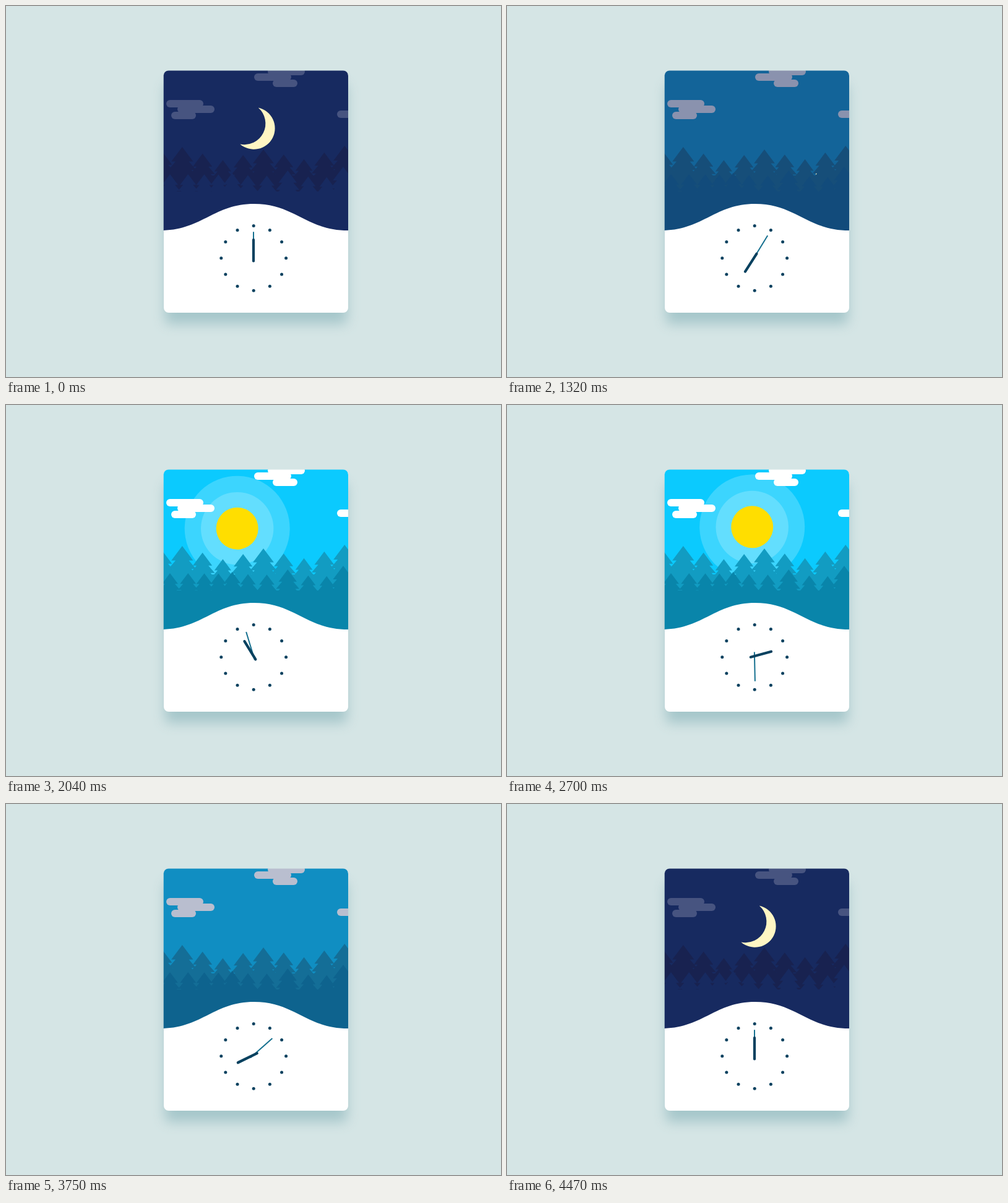
An HTML page that plays this animation: 800x600 px, repeating every 4.5 s.

```html
<!DOCTYPE html>
<html lang="en">
<head>
<meta charset="utf-8">
<title>Day and night clock</title>
<style>
  html, body { margin: 0; width: 100%; height: 100%; overflow: hidden; background: #d5e5e5; }
  .card {
    position: absolute; left: 254.7px; top: 104.5px; width: 298.3px; height: 391px;
    border-radius: 8px; background: #fff; box-shadow: 0 20px 20px -2px #a5c6ca;
  }
  svg { position: absolute; left: 0; top: 0; display: block; }
</style>
</head>
<body>
<div class="card"></div>
<svg width="800" height="600" viewBox="0 0 800 600">
  <clipPath id="card"><rect x="254.7" y="104.5" width="298.3" height="391" rx="8"/></clipPath>
  <clipPath id="hill" clip-path="url(#card)">
    <path d="M249 100V363C317 363 335 320 401 320S485 363 553 363V100Z"/>
  </clipPath>
  <g clip-path="url(#hill)">
    <rect id="sky" x="250" y="100" width="310" height="280"/>
    <g id="wheel">
      <path transform="translate(400.5 197.7)" fill="#fff6c3"
        d="M7.2-33.2A34 34 0 1 1-22.2 25.7A34 34 0 0 0 7.2-33.2Z"/>
      <g transform="rotate(178.4 400.5 351) translate(400.5 197.3)">
        <circle r="85" fill="#fff" opacity=".2"/>
        <circle r="58.7" fill="#fff" opacity=".2"/>
        <circle r="34" fill="#ffde00"/>
      </g>
    </g>
    <g id="clouds"></g>
    <path id="back"/>
    <path id="front"/>
  </g>
  <g id="dots" fill="#08415f"></g>
  <path id="minute" d="M400 412.5V365.3" stroke="#15708f" stroke-width="2"/>
  <path id="hour" d="M400 412.4V378" stroke="#08415f" stroke-width="4.2" stroke-linecap="round"/>
</svg>
<script>
const LOOP = 4500, STEP = 30, DAY = 4470, HOUR = DAY / 24;
const { PI, sin, cos } = Math;
const $ = id => document.getElementById(id);
const repeat = (n, make) => Array.from({ length: n }, (_, i) => make(i)).join("");

// three tiers of branches, each wider than the one above
function tree(x, y, s) {
  const right = [[0, 0]];
  for (let k = 0; k < 3; k++) {
    const drop = 24 + 14 * k;
    right.push([18 + 5 * k, drop], [11 + 4 * k, drop]);
  }
  right.push([28, 54], [28, 170]);
  const left = right.map(([dx, dy]) => [-dx, dy]).reverse();
  return `M${[...right, ...left].map(([dx, dy]) => [x + dx * s, y + dy * s]).join("L")}Z`;
}

function backTree(i) {
  const y = 235 + 6 * sin(PI * i / 9) - 9 * sin(PI * i / 2);
  return tree(252 + 32.8 * i, y, 1 - (y - 226) / 96);
}

function frontTree(i) {
  const u = i / 10;
  const x = 265 + 28 * i - 9 * sin(PI * u) + 5 * sin(3 * PI * u);
  const y = 272 - 12 * u * u * cos(2 * PI * (i - 1) / 3);
  return tree(x, y, .72 + (272 - y) / 60);
}

const ground = y => `M250 ${y}H560V400H250Z`;
const bar = (x, y, w) => `<rect x="${x}" y="${y}" width="${w}" height="12" rx="6"/>`;
const cloud = (x, y, shift) => bar(x, y, 60) + bar(x + shift, y + 9, 60) + bar(x + 8, y + 19, 40);
const dot = i =>
  `<circle cx="${400.2 + 52.4 * sin(i * PI / 6)}" cy="${407.8 - 52.4 * cos(i * PI / 6)}" r="2.5"/>`;

$("back").setAttribute("d", repeat(10, backTree) + ground(274));
$("front").setAttribute("d", repeat(11, frontTree) + ground(300));
$("clouds").innerHTML = cloud(259, 152, 18) + cloud(423, 100, -22) + cloud(557, 160, -22);
$("dots").innerHTML = repeat(12, dot);

// night and day colours
const tints = {
  sky: [[23, 42, 96], [11, 202, 254]],
  clouds: [[71, 84, 128], [255, 255, 255]],
  back: [[24, 34, 80], [18, 156, 194]],
  front: [[23, 42, 96], [9, 133, 170]]
};

const ramp = (h, a, b) => Math.min(1, Math.max(0, (h - a) / (b - a)));
const ease = u => u * u * (3 - 2 * u);
const turn = (id, deg, x, y) => $(id).setAttribute("transform", `rotate(${deg} ${x} ${y})`);

function draw(ms) {
  const t = Math.floor(ms % LOOP / STEP) * STEP;
  const h = t / HOUR;
  turn("hour", h * 30, 400, 406);
  turn("minute", h * 360, 400, 406);
  turn("wheel", 180 * (ease(ramp(h, 4, 12)) + ease(ramp(h, 16, 24))), 400.5, 351);
  const light = ramp(h, 6, 9) - ramp(h, 19, 22);
  for (const [id, [night, day]] of Object.entries(tints)) {
    const mix = night.map((n, i) => Math.round(n + (day[i] - n) * light));
    $(id).setAttribute("fill", `rgb(${mix})`);
  }
}

const start = performance.now();
function tick() {
  draw(performance.now() - start);
  requestAnimationFrame(tick);
}
tick();
</script>
</body>
</html>
```
